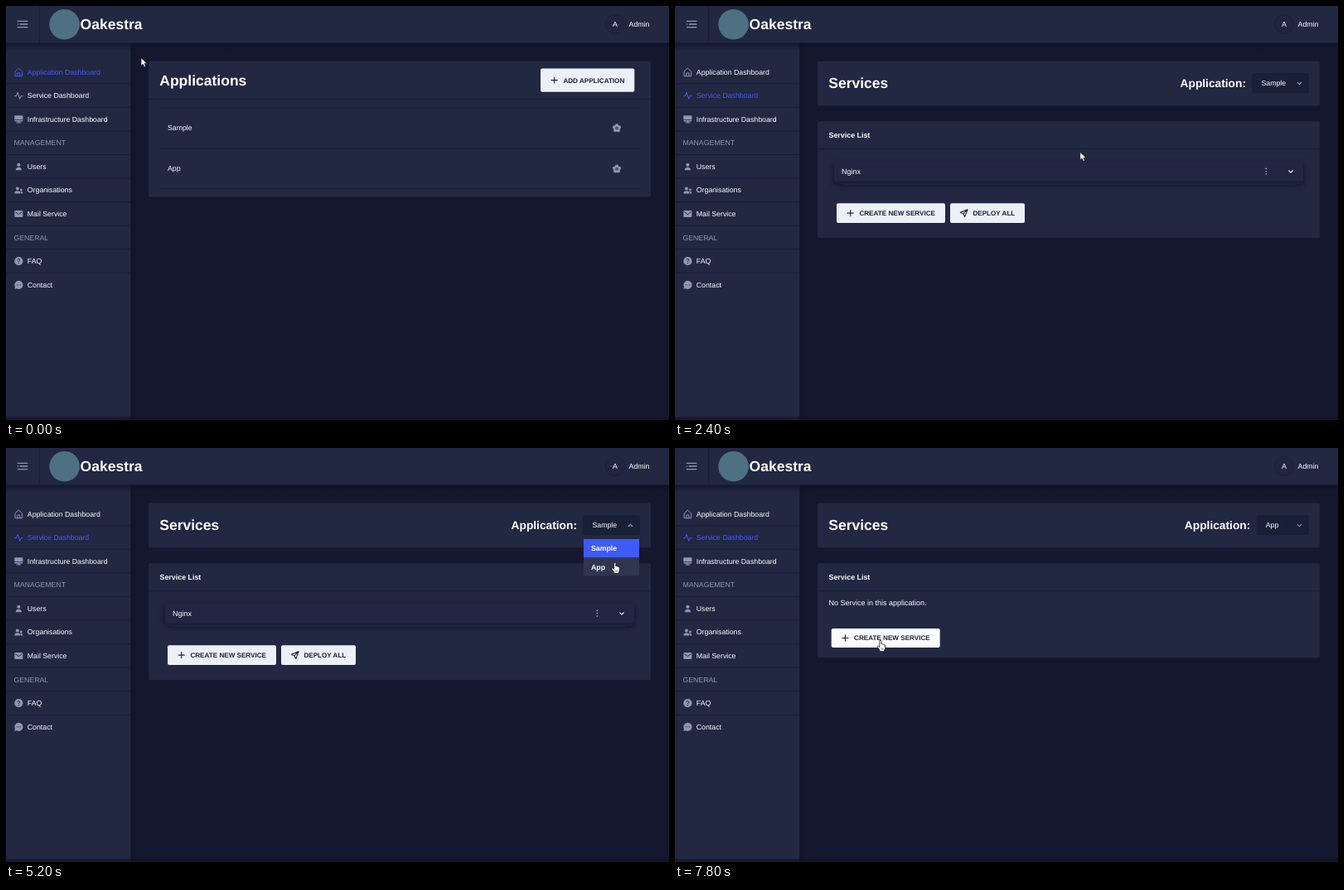
Write an HTML page that moves like this. It is 800 by 500 pixels and loops after 8000 ms.

```html
<!DOCTYPE html>
<html lang="en">
<head>
<meta charset="utf-8">
<title>Dashboard</title>
<style>
  html, body { margin: 0; width: 100%; height: 100%; overflow: hidden; background: #15172e; }
  svg { display: block; width: 800px; height: 500px; }
  text { font-family: "Liberation Sans", Arial, sans-serif; font-size: 8.75px; fill: #fff; text-rendering: geometricPrecision; white-space: pre; }
  .b { font-weight: 700; }
  .line { stroke: #191d36; stroke-width: 1; }
  .card { fill: #222742; }
  .ico { fill: #8f97b5; stroke: none; }
  .out { fill: none; stroke: #8f97b5; stroke-width: 1; stroke-linecap: round; stroke-linejoin: round; }
  .dark { fill: none; stroke: #1b2140; stroke-width: 1.1; stroke-linecap: round; stroke-linejoin: round; }
  .hole { fill: #222742; }
</style>
</head>
<body>
<svg id="stage" viewBox="0 0 800 500" xmlns="http://www.w3.org/2000/svg"></svg>
<script>
const LOOP = 8000, STEP = 200;
const BLUE = '#4759f5', HOVER = '#7084ff', GREY = '#8f97b5';
const stage = document.getElementById('stage');

const text = (x, y, s, size = 8.75, cls = '', extra = '') =>
  `<text x="${x}" y="${y}" class="${cls}" style="font-size:${size}px" ${extra}>${s}</text>`;
const rect = (x, y, w, h, fill, r = 0, extra = '') =>
  `<rect x="${x}" y="${y}" width="${w}" height="${h}" rx="${r}" fill="${fill}" ${extra}/>`;
const hline = (x1, x2, y) => `<path class="line" d="M${x1} ${y}H${x2}"/>`;
const group = (id, body) => `<g id="${id}">${body}</g>`;
const at = (x, y, body) => `<g transform="translate(${x} ${y})">${body}</g>`;
const chevron = (x, y, color, id = '') =>
  at(x, y, `<path id="${id}" d="M-2.3 -1.1L0 1.2L2.3 -1.1" fill="none" stroke="${color}" stroke-width="1.1" stroke-linecap="round" stroke-linejoin="round"/>`);
const plus = '<path class="dark" d="M-3.6 0H3.6M0 -3.6V3.6"/>';
const plane = '<path class="dark" d="M4.4 -4.4L-4.4 -.9L-.7 .8L1 4.5ZM4.4 -4.4L-.7 .8"/>';

function button(id, x, y, w, h, icon, label) {
  const mid = y + h / 2;
  return rect(x, y, w, h, '#edf1f7', 2, `id="${id}"`) + at(x + 16.7, mid, icon) +
    text(x + 27.4, mid + 2.9, label, 8.125, 'b', 'style="" fill="#1b2140"').replace('font-size:8.125px', 'font-size:8.125px;fill:#1b2140');
}

function flower(y) {
  let s = '';
  for (let i = 0; i < 5; i++) {
    const a = (i * 72 - 90) * Math.PI / 180;
    s += `<circle class="ico" cx="${(3 * Math.cos(a)).toFixed(2)}" cy="${(3 * Math.sin(a)).toFixed(2)}" r="2.2"/>`;
  }
  return at(737, y, s + '<circle class="ico" r="2.8"/><circle r="1.7" class="hole"/><circle r=".8" class="ico"/>');
}

const icons = {
  home: '<path class="out" d="M-4.3 4.6V-.6L0 -4.7L4.3 -.6V4.6ZM-1.5 4.6V1.2H1.5V4.6"/>',
  pulse: '<path class="out" d="M-4.8 .4H-2.8L-1.2 -4L1.4 4L2.9 .4H4.8"/>',
  screen: '<path class="ico" d="M-4.2 -4.6H4.2Q5.1 -4.6 5.1 -3.7V.3H-5.1V-3.7Q-5.1 -4.6 -4.2 -4.6ZM-5.1 1H5.1Q5.1 2.7 4.2 2.7H.6V3.7H2.8V4.7H-2.8V3.7H-.6V2.7H-4.2Q-5.1 2.7 -5.1 1Z"/>',
  person: '<circle class="ico" cy="-2.1" r="2.1"/><path class="ico" d="M-3.6 4.3Q-3.6 .7 0 .7T3.6 4.3Z"/>',
  people: '<circle class="ico" cx="-1.5" cy="-1.9" r="2"/><path class="ico" d="M-5 4Q-5 .8 -1.5 .8T2 4Z"/><circle class="ico" cx="2.9" cy="-.5" r="1.5"/><path class="ico" d="M2.8 4Q2.7 2.4 1.8 1.7Q5 .9 5.1 4Z"/>',
  mail: '<rect class="ico" x="-5" y="-4" width="10" height="8" rx="1"/><path d="M-4 -2.4L0 .6L4 -2.4" fill="none" stroke="#222742"/>',
  help: '<circle class="ico" r="5.1"/><path d="M-1.4 -1.3Q-1.3 -2.6 0 -2.6T1.4 -1.3Q1.4 -.3 0 .1V.9" fill="none" stroke="#222742" stroke-width="1"/><circle class="hole" cy="2.5" r=".65"/>',
  chat: '<path class="ico" d="M-5 5L-4.4 2.4A5.1 5.1 0 1 1 -2.2 4.6Z"/><circle class="hole" cx="-2" r=".6"/><circle class="hole" r=".6"/><circle class="hole" cx="2" r=".6"/>'
};

const menu = [
  ['Application Dashboard', 'home'], ['Service Dashboard', 'pulse'], ['Infrastructure Dashboard', 'screen'],
  ['MANAGEMENT'], ['Users', 'person'], ['Organisations', 'people'], ['Mail Service', 'mail'],
  ['GENERAL'], ['FAQ', 'help'], ['Contact', 'chat']
];
const ROW = 28.56, TOP = 79.5;

const sidebar = menu.map(([label, icon], i) => {
  const y = TOP + i * ROW;
  const body = icon
    ? at(15.3, y + .2, icons[icon]) + text(25.8, y + 3.1, label)
    : `<text x="9.4" y="${y + 3.1}" style="fill:${GREY}">${label}</text>`;
  return group('nav' + i, body) + (i < menu.length - 1 ? hline(0, 150, (y + 14.3).toFixed(1)) : '');
}).join('');

const appsPage = rect(172, 66.5, 606, 164, '#222742', 2) +
  text(185.3, 95.6, 'Applications', 17.5, 'b') +
  button('addBtn', 645, 75.5, 113.3, 28.3, plus, 'ADD APPLICATION') +
  hline(172, 778, 112.5) + [123, 172, 220.7].map(y => hline(185, 765, y)).join('') +
  text(195, 150.3, 'Sample') + flower(147.5) + text(195, 199.4, 'App') + flower(196.8);

const sampleList = rect(172, 139.3, 606, 141, '#222742', 2) +
  rect(192, 187.3, 566, 24.2, '#222742', 2, 'filter="url(#soft)"') +
  text(201, 202.6, 'Nginx', 9) +
  [-3.3, 0, 3.3].map(d => `<circle cx="713.3" cy="${199.7 + d}" r=".8" fill="#c3c8dc"/>`).join('') +
  chevron(743, 199.9, '#fff') +
  button('newBtn', 195, 238.3, 131, 23.6, plus, 'CREATE NEW SERVICE') +
  button('deployBtn', 332, 238.3, 90, 23.6, plane, 'DEPLOY ALL');

const emptyList = rect(172, 139.3, 606, 114, '#222742', 2) +
  text(185.5, 190.4, 'No Service in this application.', 9) +
  button('createBtn', 188.7, 218, 131, 23, plus, 'CREATE NEW SERVICE');

const servicesPage = rect(172, 66.5, 606, 54, '#222742', 2) +
  text(185.3, 99.3, 'Services', 17.5, 'b') +
  text(689, 98, 'Application:', 13.75, 'b', 'id="appLabel" text-anchor="end"') +
  rect(696.5, 81.7, 68, 23, '#1a1f38', 2, 'id="field"') +
  text(707.5, 96.3, 'Sample', 8.75, '', 'id="choice"') +
  chevron(753.5, 93.4, GREY, 'arrowMark') +
  group('sampleList', sampleList) + group('emptyList', emptyList) +
  text(185.5, 158.8, 'Service List', 8.9, 'b') + hline(172, 778, 172.5) +
  group('options',
    rect(697, 110, 67, 22.5, '#3f5bf6') + rect(697, 132.5, 67, 22, '#2a2f4b', 0, 'id="optApp"') +
    text(706, 124.3, 'Sample', 8.75, 'b') + text(706, 146.6, 'App', 8.75, 'b'));

stage.innerHTML =
  `<defs><filter id="soft" x="-10%" y="-50%" width="120%" height="300%">
     <feDropShadow dx="0" dy="4" stdDeviation="3.5" flood-color="#101426" flood-opacity=".65"/></filter>
   <linearGradient id="down" x2="0" y2="1"><stop stop-color="#101226" stop-opacity=".75"/><stop offset="1" stop-color="#101226" stop-opacity="0"/></linearGradient>
   <linearGradient id="side"><stop stop-color="#101226" stop-opacity=".7"/><stop offset="1" stop-color="#101226" stop-opacity="0"/></linearGradient></defs>` +
  rect(0, 0, 800, 500, '#15172e') + rect(0, 44.5, 150.5, 455.5, '#222742') +
  rect(150.5, 44.5, 8, 455.5, 'url(#side)') +
  group('apps', appsPage) + group('services', servicesPage) + sidebar +
  rect(0, 44.5, 800, 10, 'url(#down)') + rect(0, 496, 800, 4, '#101226', 0, 'opacity=".55"') +
  rect(0, 0, 800, 44.5, '#222742') + '<path class="line" d="M40.5 0V44.5"/>' +
  at(20, 22, '<circle class="ico" cx="-5.6" r=".8"/><path class="out" style="stroke-width:1.3;stroke-linecap:butt" d="M-6.2 -3.6H6.3M-3.4 0H6.3M-6.2 3.6H6.3"/>') +
  '<circle cx="70.6" cy="22.2" r="18.3" fill="#4d7083"/>' +
  text(89.6, 28, 'Oakestra', 17.5, 'b') +
  '<circle cx="735" cy="22" r="11.6" fill="#202540" stroke="#1c213a"/>' +
  text(735, 25, 'A', 8.75, '', 'text-anchor="middle"') + text(751.6, 25.1, 'Admin') +
  group('arrow', '<path d="M0 0V9.8L2.3 7.7L3.9 11.2L5.6 10.4L4.1 7.1L7.1 6.9Z" fill="#fff" stroke="#0b0d1c" stroke-width=".7"/>') +
  group('hand', '<path d="M-1.1 .9Q-1.1 -.1 0 -.1T1.1 .9V4.2Q2 3.6 2.8 4.6Q3.7 4.1 4.3 5.1Q5.6 4.8 5.6 6.3V9Q5.6 10.6 4.6 11.7V13.2H-1V11.8L-3.6 8Q-4.2 6.9 -3.4 6.5Q-2.6 6.2 -1.1 8Z" fill="#fff" stroke="#0b0d1c" stroke-width=".8"/><path d="M1.2 8.9V11.3M2.8 8.9V11.3" stroke="#0b0d1c" stroke-width=".5"/>');

const $ = id => document.getElementById(id);
const show = (id, on) => $(id).style.display = on ? '' : 'none';
const set = (id, attrs) => { for (const k in attrs) $(id).setAttribute(k, attrs[k]); };

// time, x, y of the pointer tip
const path = [
  [200, 163, 62.5], [1200, 104, 103], [1800, 104, 103], [2600, 560, 190], [2800, 560, 190],
  [3600, 634, 151], [4200, 730, 94], [4600, 730, 94], [5000, 734.7, 138.4], [5400, 734.7, 138.4],
  [6200, 673.3, 199], [7400, 248, 232.5], [8000, 248, 232.5]
];

function pointer(t) {
  if (t <= path[0][0]) return path[0].slice(1);
  const i = path.findIndex(p => p[0] >= t);
  const [t0, x0, y0] = path[i - 1], [t1, x1, y1] = path[i];
  const k = (t - t0) / (t1 - t0), e = k * k * (3 - 2 * k);
  return [x0 + (x1 - x0) * e, y0 + (y1 - y0) * e];
}

function tint(i, color) {
  const nav = $('nav' + i);
  nav.querySelector('text').style.fill = color || '';
  nav.querySelectorAll('.out').forEach(p => p.style.stroke = color || '');
  nav.querySelectorAll('.ico').forEach(p => p.style.fill = color || '');
}

function draw(t) {
  const [x, y] = pointer(t);
  const inside = (l, top, r, b) => x >= l && x <= r && y >= top && y <= b;
  const onServices = t >= 1600, onApp = t >= 5400, open = t >= 4400 && !onApp;
  const focus = onApp && t < 7600;
  const row = inside(0, 65, 150, 350) ? Math.floor((y - 65.2) / ROW) : -1;

  show('apps', !onServices);
  show('services', onServices);
  show('sampleList', !onApp);
  show('emptyList', onApp);
  show('options', open);
  menu.forEach(([, icon], i) => {
    if (icon) tint(i, i === row ? HOVER : i === +onServices ? BLUE : '');
  });

  const left = onApp ? 702 : 696.5;
  set('appLabel', { x: onApp ? 694.3 : 689 });
  set('field', { x: left, width: 764.5 - left, stroke: focus ? '#3a52e0' : '#1a1f38' });
  set('choice', { x: onApp ? 712.7 : 707.5 });
  $('choice').textContent = onApp ? 'App' : 'Sample';
  $('choice').style.fill = t === 1600 ? GREY : '';
  set('arrowMark', { transform: open ? 'scale(1 -1)' : '' });

  const overApp = open && inside(697, 132.5, 764, 154.5);
  const overCreate = onApp && inside(188.7, 218, 319.7, 241);
  set('optApp', { fill: overApp ? '#30364f' : '#2a2f4b' });
  set('createBtn', { fill: overCreate ? '#fafcff' : '#edf1f7' });

  const overField = onServices && inside(left, 81.7, 764.5, 104.7);
  const overOption = open && inside(697, 110, 764, 154.5);
  const hand = row >= 0 || overField || overOption || overCreate || (onApp && t < 5600);
  show('hand', hand);
  show('arrow', !hand);
  set(hand ? 'hand' : 'arrow', { transform: `translate(${x.toFixed(2)} ${y.toFixed(2)})` });
}

const start = performance.now();
function tick() {
  const t = (performance.now() - start) % LOOP;
  draw(Math.floor(t / STEP) * STEP);
  requestAnimationFrame(tick);
}
tick();
</script>
</body>
</html>
```
